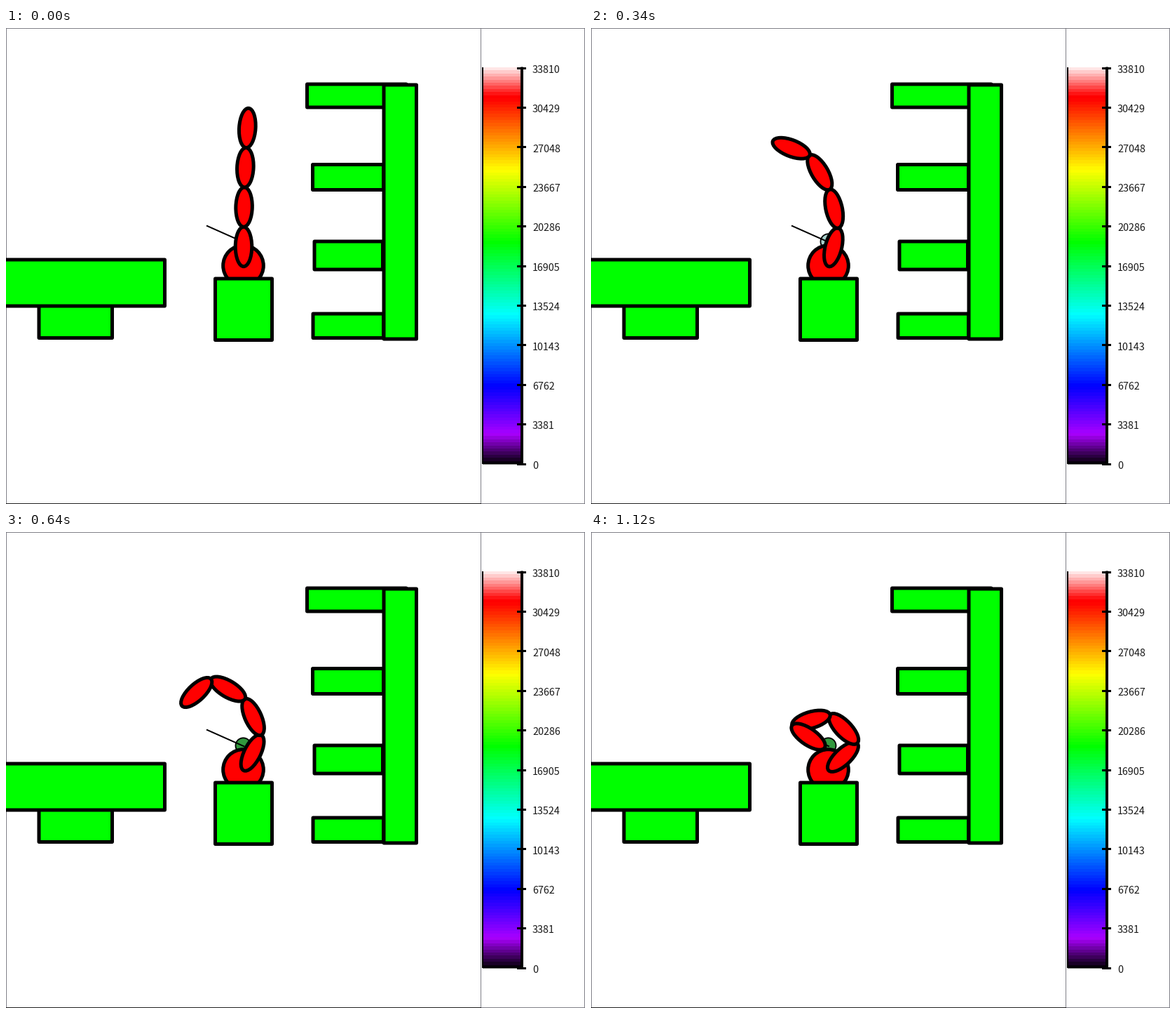
A matplotlib script that plays this animation: 826x678 px, repeating every 1140 ms.

```python
import colorsys

import matplotlib.pyplot as plt
import numpy as np
from matplotlib.animation import FuncAnimation
from matplotlib.patches import Circle, Ellipse, Rectangle

W, H, DPI = 826, 678, 100
FRAMES, INTERVAL = 57, 20
PX = 72 / DPI  # points per pixel

GREEN, RED, GRAY = "#00ff00", "#ff0000", "#808088"
BASE = np.array([339.0, 339.7])
LINK = 56.4
# Link angles in degrees, clockwise from upright, and their change per frame
START = np.linspace(0, 3.6, 4)
RATE = np.array([0.83, -0.8, -1.935, -4.27])

plt.rcParams["path.snap"] = False
fig = plt.figure(figsize=(W / DPI, H / DPI), dpi=DPI, facecolor="white")
ax = fig.add_axes([0, 0, 1, 1])
ax.axis("off")


def line(x0, y0, x1, y1, width, color="black", z=3):
    ax.plot([x0, x1], [y0, y1], color=color, lw=width * PX, zorder=z,
            solid_capstyle="butt")


def box(x0, y0, x1, y1, z=4):
    ax.add_patch(Rectangle((x0, y0), x1 - x0, y1 - y0, fc=GREEN, ec="black",
                           lw=5 * PX, joinstyle="round", zorder=z))


def ramp_color(y):
    """Rainbow from purple to red, fading to black below and white above."""
    hue = np.clip((y - 100) / 1.71, 0, 280) / 360
    value = np.clip((621 - y) / 43, 0, 1)
    saturation = np.clip((y - 54) / 43, 0, 1)
    return colorsys.hsv_to_rgb(hue, saturation, value)


def draw_scale(top=56, bottom=621, bands=128, ticks=11, peak=33810):
    edges = np.linspace(top, bottom, bands + 1)
    centers = (edges[:-1] + edges[1:]) / 2
    ramp = np.array([[ramp_color(y)] for y in centers])
    ax.imshow(ramp, extent=(680, 735, bottom, top), aspect="auto",
              interpolation="nearest", zorder=2)
    line(680, top, 680, bottom, 2)
    line(680, 620.5, 736, 620.5, 2)
    line(736, 55.5, 736, 622, 4)
    for i, y in enumerate(np.linspace(57, 621, ticks)):
        mark = int(y) + 0.5
        line(729, mark, 742, mark, 3)
        ax.text(751, y + 6.8, str(peak - i * peak // (ticks - 1)),
                fontsize=14.4 * PX, family="Noto Sans CJK JP",
                color="#1a1a1a", va="baseline")


def draw_frame():
    for x in (0.5, 677.5, W - 0.5):
        line(x, 0, x, H, 1, GRAY)
    line(0, 0.5, W, 0.5, 1, GRAY)
    line(678, H - 0.5, W, H - 0.5, 1, GRAY)
    line(0, H - 0.5, 678, H - 0.5, 1, "#202020")


def draw_scene():
    # Table, its leg and the arm stand
    box(47, 395.5, 151.5, 441.5)
    box(-10, 330, 226.5, 396)
    box(298.5, 357, 379.5, 444.5, z=8)

    # Rack: four shelves and a column
    box(429.5, 80, 571, 113)
    box(437.5, 194.5, 538.5, 230.5)
    box(440, 304, 537.5, 344)
    box(438, 407, 538.5, 441.5)
    box(539, 81, 585.5, 443, z=5)

    ax.add_patch(Circle((338.5, 338.5), 28.8, fc=RED, ec="black",
                        lw=5 * PX, zorder=7))
    line(286, 281.5, 340, 305.5, 2, z=6)


def knob_color(i):
    white, teal, green = np.array([(255, 255, 255), (82, 163, 152),
                                   (50, 152, 62)]) / 255
    color = white + (teal - white) * np.clip((i - 10) / 14, 0, 1)
    return color + (green - teal) * np.clip((i - 24) / 8, 0, 1)


draw_frame()
draw_scene()
draw_scale()
knob = ax.add_patch(Circle((338.5, 304.3), 11, ec="black", lw=1.8 * PX,
                           zorder=5))
links = [ax.add_patch(Ellipse((0, 0), 23.5, LINK, fc=RED, ec="black",
                              lw=5 * PX, zorder=9 + k)) for k in range(4)]
ax.set_xlim(0, W)
ax.set_ylim(H, 0)


def update(i):
    joint = BASE
    for link, angle in zip(links, START + RATE * i):
        a = np.radians(angle)
        step = LINK * np.array([np.sin(a), -np.cos(a)])
        link.set_center(joint + step / 2)
        link.set_angle(angle)
        joint = joint + step
    knob.set_facecolor(knob_color(i))
    return [*links, knob]


anim = FuncAnimation(fig, update, frames=FRAMES, interval=INTERVAL,
                     repeat=True, repeat_delay=0)
plt.show()
```
